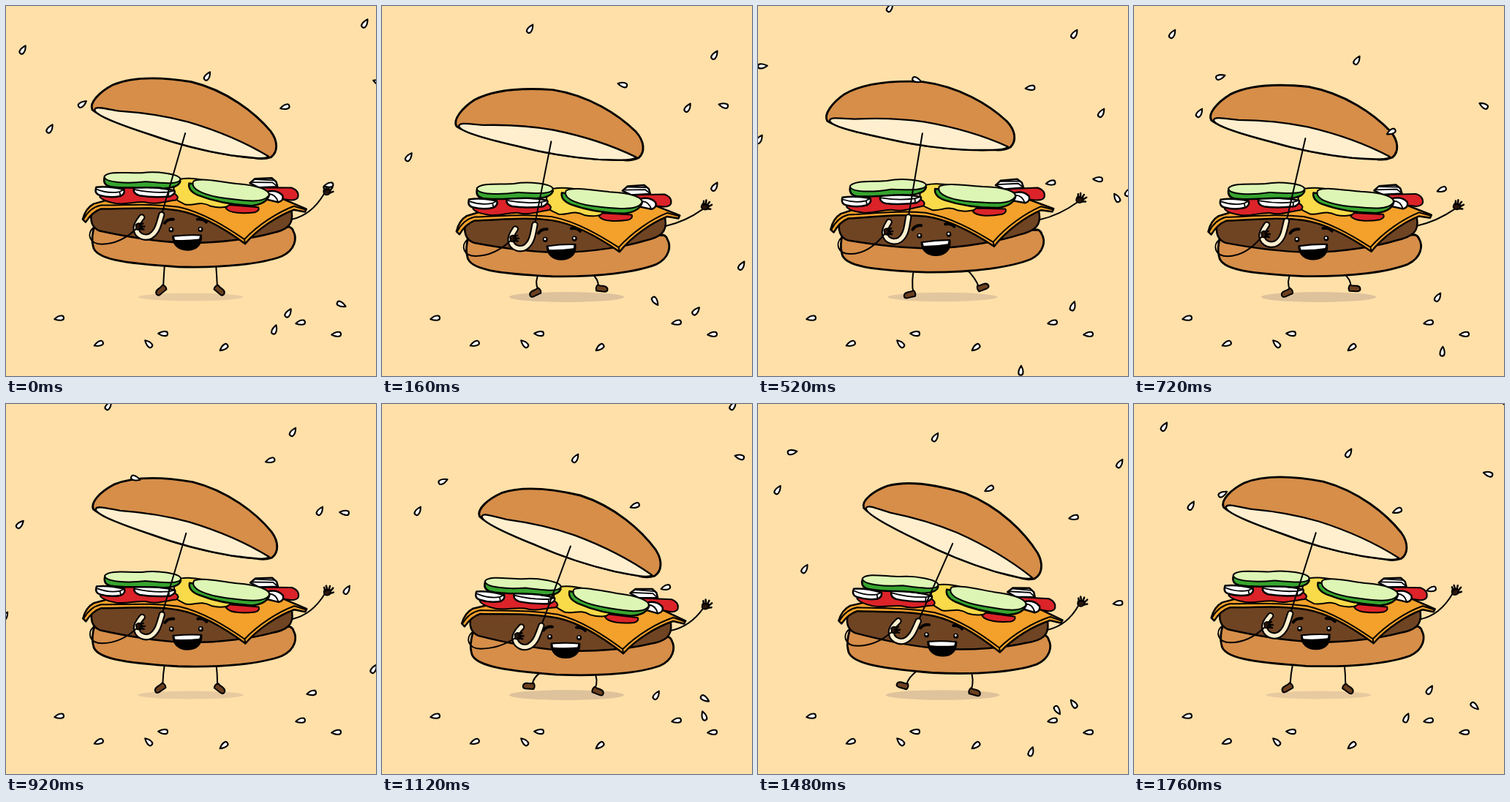
Animation of 506x506 px, one loop 1.8 s. Source, as an HTML page with a canvas:

```html
<!DOCTYPE html>
<html lang="en">
<head>
<meta charset="utf-8">
<title>Burger in the seed rain</title>
<style>
html, body { margin: 0; width: 100%; height: 100%; overflow: hidden; background: #ffe0a9; }
canvas { display: block; width: 506px; height: 506px; }
</style>
</head>
<body>
<canvas id="stage" width="506" height="506"></canvas>
<script>
const ctx = document.getElementById('stage').getContext('2d');
const LOOP = 1800, STEP = 40, BOUNCE = LOOP / 4, TAU = Math.PI * 2, DEG = Math.PI / 180;
const INK = '#000', BUN = '#d68e49', CREAM = '#ffefcf', PATTY = '#6f4423', CHEESE = '#f3a12b',
      RED = '#db2329', GREEN = '#37a42f', LIME = '#def6b5', WHITE = '#fff', SKIN = '#2b160b';

function draw(d, fill, width = 2.5) {
  const path = new Path2D(d);
  if (fill) { ctx.fillStyle = fill; ctx.fill(path); }
  if (width) line(path, width);
}
function line(path, width, color = INK) {
  ctx.strokeStyle = color;
  ctx.lineWidth = width;
  ctx.stroke(path);
}
function oval(x, y, rx, ry, fill) {
  ctx.beginPath();
  ctx.ellipse(x, y, rx, ry, 0, 0, TAU);
  ctx.fillStyle = fill;
  ctx.fill();
}
function place(x, y, turn, paint) {
  ctx.save();
  ctx.translate(x, y);
  ctx.rotate(turn * DEG);
  paint();
  ctx.restore();
}
function rotate(x, y, turn) {
  const c = Math.cos(turn * DEG), s = Math.sin(turn * DEG);
  return [x * c - y * s, x * s + y * c];
}

// One sway to each side and four bounces per loop drive everything.
function pose(t) {
  const angle = TAU * t / LOOP;
  const sway = Math.sin(angle), twist = Math.sin(2 * angle);
  const dip = 15 * Math.abs(Math.sin(Math.PI * (t + 12) / BOUNCE)) - 1.6;
  return {
    sway, dip,
    dx: -5 * sway,
    lean: -.4 - 2.8 * sway,
    stickX: 213.3 - 7.5 * sway,
    stickY: 283.8 - 2.5 * sway + 2.5 * twist + dip,
    stickTurn: 16.2 - 7.5 * sway - 1.2 * twist,
    handX: 440 + .3 * dip,
    handY: 251.5 + 1.65 * dip,
    handTurn: 1.5 * dip + 10 * sway - 8
  };
}

// Body parts are drawn in rest coordinates and turn about this point.
const MID = { x: 258, y: 310 };
function inBody(p, turn, paint) {
  place(MID.x + p.dx, MID.y + p.dip, turn, () => {
    ctx.translate(-MID.x, -MID.y);
    paint();
  });
}
function bodyPoint(p, x, y) {
  const [rx, ry] = rotate(x - MID.x, y - MID.y, p.lean);
  return [MID.x + p.dx + rx, MID.y + p.dip + ry];
}

function shadow(p) {
  const k = Math.max(0, Math.min(1, p.dip / 12));
  const tone = [233 - 12 * k, 203 - 9 * k, 160 - 4 * k].map(Math.round);
  oval(252.5, 398, 71.5 + 7 * k, 5.3 + 1.6 * k, `rgb(${tone})`);
}

// The foot on the side away from the sway kicks out while the other is planted.
function leg(p, side) {
  const kick = Math.max(0, side * p.sway), plant = Math.max(0, -side * p.sway);
  const x = 252 + side * (40 + 16 * kick + 4.5 * plant);
  const y = 389 - 4.5 * kick + 6 * plant;
  const turn = side * (34 - 62 * kick - 26 * plant);
  const [ox, oy] = rotate(-5 * side, -2, turn);
  const ax = x + ox, ay = y + oy;
  const hx = 252 + 35 * side + p.dx * .7, hy = 352 + p.dip;
  const cx = hx * .4 + ax * .6 + side * Math.max(0, p.dip) * .5;
  draw(`M${hx} ${hy}Q${cx} ${(hy + ay) / 2} ${ax} ${ay}`, null, 2);
  place(x, y, turn, () => {
    ctx.scale(-side, 1);
    draw('M-8 1C-8-4-2-4 2-4L6-5Q9-1 7 3L-4 4Q-8 4-8 1Z', '#6b4020', 2);
  });
}

function bottomBun() {
  draw('M121 300Q116 318 119 328C121 346 160 352 235 357C300 359 350 353 377 343' +
    'C396 334 398 318 393 309Q392 305 388 303Z', BUN, 2.8);
}

function patty() {
  draw('M118 278C115 290 116 302 128 307C150 312 190 321 240 324C290 326 340 318 362 312' +
    'C385 308 393 300 391 284Q390 276 380 270L140 265Z', PATTY);
}

function face() {
  draw('M217 297Q221 291 229 292', null, 4);
  draw('M262 292Q270 291 274 296', null, 4);
  for (const x of [226, 266]) {
    oval(x, 306, 3.5, 3.6, INK);
    oval(x - .3, 305.3, 1.5, 1.5, WHITE);
  }
  draw('M228 315Q248 313 267 314C268 327 260 334 248 334C236 334 228 327 228 315Z', INK, 2);
  draw('M230 316Q248 314 265 315L264 319Q248 321 231 320Z', WHITE, 0);
}

function cheese() {
  draw('M105 291L109 295Q118 281 130 277C170 277 200 274 236 280C268 286 300 306 327 326' +
    'C345 305 372 288 394 280L409 283L411 279L372 262L150 262L120 270Q109 276 105 291Z', CHEESE);
  draw('M106 291Q115 275 130 272C170 272 200 270 236 275C270 283 300 302 326 320' +
    'C345 300 372 283 394 275L410 280M326 320L327 326', null, 2);
}

function toppings() {
  draw('M230 240C240 234 262 236 275 240L308 268C308 276 292 277 280 274C265 266 258 274 245 272Q236 268 228 262Z', '#f9da49', 2);
  draw('M128 262C135 250 160 246 190 250L230 257Q238 262 232 266C215 268 205 273 190 269C175 268 165 273 150 271Q132 268 128 262Z', RED, 2);
  draw('M123 249Q120 258 128 260Q142 264 156 261Q163 258 161 252Q140 247 123 249Z', WHITE);
  draw('M124 252Q140 258 155 255L161 252M155 255L156 260', null, 1.8);
  draw('M175 249Q172 257 182 260Q200 263 224 261Q232 257 230 253Q205 247 175 249Z', WHITE);
  draw('M176 252Q200 257 222 255L230 253M222 255L222 260', null, 1.8);
  draw('M333 242L340 236L363 235L369 240L371 247L345 248Z', WHITE);
  draw('M335 241L364 241L370 246M340 237L366 238', null, 1.8);
  draw('M345 248L390 248Q401 252 399 261Q396 267 382 264L350 260Z', RED, 2);
  draw('M356 254Q370 250 378 259Q380 266 372 268L355 264Z', WHITE);
  draw('M358 257Q368 256 372 268', null, 1.8);
  draw('M300 276C305 284 325 284 340 282Q347 280 345 275L305 272Z', RED, 2);
  draw('M134 236Q132 246 142 248C165 252 190 247 215 250Q236 249 238 240Z', GREEN);
  draw('M134 234C140 226 165 230 185 229C205 226 236 230 238 237C238 245 215 243 190 241C165 244 134 243 134 234Z', LIME, 2);
  draw('M250 243Q248 253 262 259C285 268 310 272 335 273Q357 271 360 257Z', GREEN);
  draw('M256 240C265 235 290 240 315 243C345 245 362 252 359 259C352 270 325 266 300 263C275 260 250 252 256 240Z', LIME, 2);
}

function wavingArm(p) {
  const [x, y] = bodyPoint(p, 391, 293);
  draw(`M${x} ${y}Q${x + 27} ${y - 6} ${p.handX - 5} ${p.handY + 6}`, null, 2);
  place(p.handX, p.handY, p.handTurn, () => {
    draw('M-6 5Q-7-1-3-1L3 0Q5 5 0 7Q-4 8-6 5Z', SKIN, 1.6);
    draw('M-4 1L-5-4M-1 0L-2-6M1 0L3-5M3 2L7-2M2 5L7 4', null, 2.5);
  });
}

const STICK = 114, BUN_TILT = -1.2;
function umbrella(p) {
  place(p.stickX, p.stickY, p.stickTurn, () => {
    place(0, -STICK, BUN_TILT, () => {
      draw('M-131 2C-138-6-128-24-113-38C-90-56-50-66-10-70C40-71 85-52 112-33C126-22 129-8 122 1' +
        'Q112 8 100 8C60 16 0 18-46 14C-85 12-118 8-131 2Z', BUN, 2.9);
      draw('M-128 1C-128-4-118-4-95-6C-60-13-25-16 0-16C40-15 80-10 118 1' +
        'C116 7 95 9 68 13C30 17-10 17-46 14C-85 12-125 9-128 1Z', CREAM, 2.3);
    });
    draw(`M0 ${-STICK}L0 0`, null, 2);
    const cane = new Path2D('M0 2C0 16 1 26-6 34C-12 40-24 40-28 30C-30 24-27 18-25 13');
    line(cane, 9.4);
    line(cane, 5.2, CREAM);
  });
}

function holdingArm(p) {
  const [x, y] = bodyPoint(p, 119, 303);
  const [ox, oy] = rotate(-25, 25, p.stickTurn);
  const hx = p.stickX + ox, hy = p.stickY + oy;
  draw(`M${x} ${y}C${x - 8} ${y + 7} ${x - 6} ${y + 22} ${x + 12} ${y + 22}` +
    `Q${x + 38} ${y + 22} ${hx - 3} ${hy + 3}`, null, 2);
  place(hx, hy, 0, () => {
    draw('M-5-1Q-2-5 2-2L4 3Q1 7-4 5Z', SKIN, 1.6);
    draw('M0-2L5-3M1 1L7 1M0 4L6 5', null, 2.4);
  });
}

// Seeds fall in straight lines, then bounce off the bun, the body or the ground.
const FALL = { x: -.455, y: .72 }, GRAVITY = .0018, SEEDS = 36, TOP = -12;

function random(n) {
  const v = Math.sin(n * 127.1 + 3.7) * 43758.5453;
  return v - Math.floor(v);
}

function bounceAt(x, y, time, ground, luck) {
  const p = pose(time % LOOP);
  const [ox, oy] = rotate(x - p.stickX, y - p.stickY, -p.stickTurn);
  const [bx, by] = rotate(ox, oy + STICK, -BUN_TILT);
  if (by < 10 && Math.hypot((bx + 3) / 128, by / 70) < 1)
    return { x: (bx < 0 ? -1 : 1) * (.42 + .22 * luck), y: -.1 - .35 * luck };
  if (Math.abs(x - 258) < 145 && y > 258 && y < 350)
    return { x: (x < 258 ? -1 : 1) * (.6 + .3 * luck), y: -.3 };
  if (y > ground) return { x: .5 * luck - .2, y: -.32 };
}

function makeSeed(i) {
  const born = i * LOOP / SEEDS, luck = random(i);
  const start = 60 + 720 * (i * .618 % 1);
  const ground = 415 + 20 * random(i + SEEDS);
  for (let age = 0; age < LOOP; age += 5) {
    const x = start + FALL.x * age, y = TOP + FALL.y * age;
    if (x < -10) break;
    const kick = bounceAt(x, y, born + age, ground, luck);
    if (kick) return { born, start, hit: age, kick };
  }
  return { born, start, hit: LOOP };
}
const rainSeeds = Array.from({ length: SEEDS }, (_, i) => makeSeed(i));

// Seeds at rest: x, y, turn.
const RESTING = [[73, 427, -10], [127, 462, -22], [195, 462, 45], [215, 448, 2], [298, 467, -38], [403, 433, -10], [452, 449, -4]];

function seed(x, y, turn) {
  place(x, y, turn, () => draw('M-6.8 0Q-1-3.7 3-3A3 3 0 0 1 3 3Q-1 3.5-6.8 0Z', WHITE, 2.1));
}

function rain(t) {
  for (const { born, start, hit, kick } of rainSeeds) {
    const age = (t - born + LOOP) % LOOP;
    const fall = Math.min(age, hit), air = age - fall;
    const v = air ? { x: kick.x, y: kick.y + GRAVITY * air } : FALL;
    const x = start + FALL.x * fall + v.x * air;
    const y = TOP + FALL.y * fall + (v.y - GRAVITY * air / 2) * air;
    seed(x, y, Math.atan2(v.y, v.x) / DEG);
  }
}

function render(t) {
  const p = pose(t);
  ctx.fillStyle = '#ffe0a9';
  ctx.fillRect(0, 0, 506, 506);
  ctx.lineCap = ctx.lineJoin = 'round';
  shadow(p);
  RESTING.forEach(s => seed(...s));
  leg(p, -1);
  leg(p, 1);
  inBody(p, p.lean / 2, bottomBun);
  wavingArm(p);
  inBody(p, p.lean, () => {
    patty();
    face();
    cheese();
  });
  inBody(p, p.lean * 1.1 + .8, toppings);
  umbrella(p);
  holdingArm(p);
  rain(t);
}

const start = performance.now();
function tick() {
  const t = (performance.now() - start) % LOOP;
  render(Math.floor(t / STEP) * STEP);
  requestAnimationFrame(tick);
}
tick();
</script>
</body>
</html>
```
